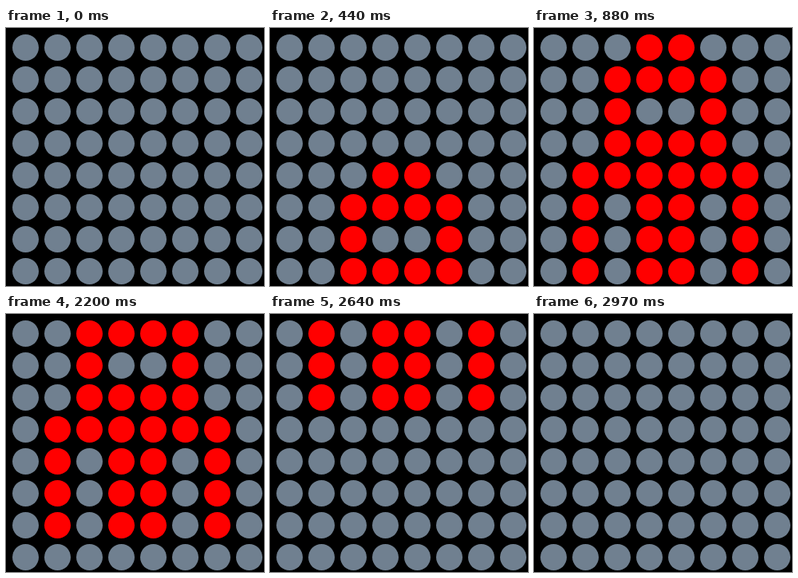
Recreate the animation shown at these times as an HTML page with a canvas. Size 323 px wide and 323 px high, loop 3300 ms.

```html
<!DOCTYPE html>
<html lang="en">
<head>
<meta charset="utf-8">
<title>LED matrix rocket</title>
<style>
  html, body { margin: 0; width: 100%; height: 100%; overflow: hidden; background: #000; }
  canvas { display: block; width: 323px; height: 323px; }
</style>
</head>
<body>
<canvas id="stage" width="323" height="323"></canvas>
<script>
const ctx = document.getElementById('stage').getContext('2d');
const SIZE = 8, PITCH = 40, FIRST = 24.5, RADIUS = 16.5;
const STEP = 110, LOOP = 3300;
const HOLD_START = 880, HOLD_END = 2200;
const ROCKET = [
  '...##...',
  '..####..',
  '..#..#..',
  '..####..',
  '.######.',
  '.#.##.#.',
  '.#.##.#.',
  '.#.##.#.'
];

// Rows the rocket has risen: climb in, hover, climb out.
function riseAt(t) {
  if (t < HOLD_START) return Math.floor(t / STEP);
  if (t < HOLD_END) return SIZE;
  return SIZE + 1 + Math.floor((t - HOLD_END) / STEP);
}

function draw(rise) {
  ctx.fillStyle = '#000';
  ctx.fillRect(0, 0, 323, 323);
  for (let row = 0; row < SIZE; row++) {
    const line = ROCKET[row + rise - SIZE] || '';
    for (let col = 0; col < SIZE; col++) {
      ctx.fillStyle = line[col] === '#' ? '#ff0000' : '#708090';
      ctx.beginPath();
      ctx.arc(FIRST + col * PITCH, FIRST + row * PITCH, RADIUS, 0, Math.PI * 2);
      ctx.fill();
    }
  }
}

const start = performance.now();
function tick() {
  draw(riseAt((performance.now() - start) % LOOP));
  requestAnimationFrame(tick);
}
tick();
</script>
</body>
</html>
```
